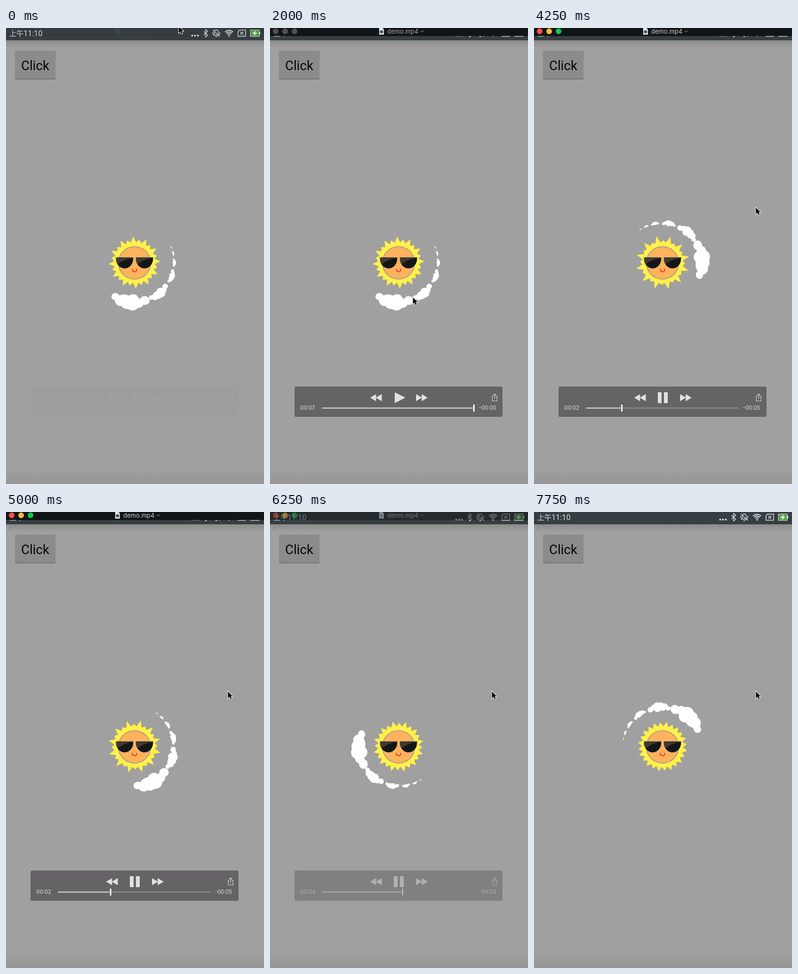
Recreate the animation shown at these times as an HTML page with a canvas. Size 546 by 964 pixels, loop 8 s.

```html
<!DOCTYPE html>
<html lang="zh">
<head>
<meta charset="utf-8">
<title>Sun loader</title>
<style>
html, body { margin: 0; width: 546px; height: 964px; overflow: hidden; background: #a0a0a0; }
canvas { display: block; }
</style>
</head>
<body>
<canvas id="stage" width="546" height="964"></canvas>
<script>
const g = document.getElementById('stage').getContext('2d');
const LOOP = 8000, STEP = 250, PLAY = 2750;
const CX = 272, CY = 496, RAD = Math.PI / 180;

const clamp = v => Math.max(0, Math.min(1, v));
const ease = (t, from, to) => {
  const p = clamp((t - from) / (to - from));
  return p * p * (3 - 2 * p);
};

function rect(x, y, w, h, color, r = 0) {
  g.fillStyle = color;
  g.beginPath();
  g.roundRect(x, y, w, h, r);
  g.fill();
}

function disc(x, y, r, color) {
  g.fillStyle = color;
  g.beginPath();
  g.arc(x, y, r, 0, 2 * Math.PI);
  g.fill();
}

function fill(d, color) {
  g.fillStyle = color;
  g.fill(new Path2D(d));
}

function line(d, color, width) {
  g.strokeStyle = color;
  g.lineWidth = width;
  g.stroke(new Path2D(d));
}

function text(s, x, y, font, color) {
  g.font = font;
  g.fillStyle = color;
  g.fillText(s, x, y);
}

function shade(y0, y1, top, bottom) {
  const fade = g.createLinearGradient(0, y0, 0, y1);
  fade.addColorStop(0, `rgba(0,0,0,${top})`);
  fade.addColorStop(1, `rgba(0,0,0,${bottom})`);
  g.fillStyle = fade;
  g.fillRect(0, y0, 546, y1 - y0);
}

function drawPage() {
  rect(0, 0, 546, 964, '#a0a0a0');
  shade(26, 42, 0.13, 0);
  shade(930, 964, 0, 0.07);
  rect(19, 48, 86, 60.5, '#676767', 2);
  rect(19, 48, 86, 59, '#8b8b8b', 2);
  text('Click', 32, 88.5, '27.5px Roboto, sans-serif', '#050505');
}

function drawStatus() {
  const ink = '#dcdfe0';
  rect(0, 0, 546, 26, '#373e42');
  text('上午', 7, 17, '15px "Noto Sans CJK SC", "Noto Sans CJK", sans-serif', ink);
  text('11:10', 37, 17, '16.2px Roboto, sans-serif', ink);
  for (let i = 0; i < 3; i++) disc(394 + 6 * i, 16, 2, ink);
  // bluetooth, muted bell, no-card box
  line('M418 7L427 15L422.5 19V3L427 7L418 15', ink, 1.4);
  line('M439 15Q441 13 441 9Q441 4 445 4T449 9Q449 13 451 15ZM443 18H447M438 4L452 18M437.5 8V13M452.5 8V13', ink, 1.4);
  line('M494 4.5H507V17.5H491V8ZM496 8L502 14M502 8L496 14', ink, 1.5);
  // wifi
  g.strokeStyle = ink;
  g.lineWidth = 2;
  for (const r of [5, 8.5, 12]) {
    g.beginPath();
    g.arc(472, 17, r, -135 * RAD, -45 * RAD);
    g.stroke();
  }
  disc(472, 16.5, 1.8, ink);
  // battery
  line('M517.5 4.5H535.5V17.5H517.5Z', ink, 1.5);
  rect(519, 6, 15, 10, '#45b52f');
  rect(536, 8, 2, 6, ink);
  fill('M529 5L521 12H526L524 17L532 10H527Z', '#fff');
}

// Long and short spikes alternate and trade length with the swing
function drawRays(phase, swing) {
  const radii = [55.5 + 2.5 * swing, 43, 49 - 2.3 * swing, 43];
  g.fillStyle = '#fff04a';
  g.beginPath();
  for (let i = 0; i < 48; i++) {
    const a = (phase + i * 7.5) * RAD, r = radii[i % 4];
    g.lineTo(CX + r * Math.cos(a), CY + r * Math.sin(a));
  }
  g.fill();
}

function drawLens(x) {
  const lens = `M${x} 485h36v3a18 20 0 0 1 -36 0z`;
  g.save();
  line(lens, '#8f8a86', 1);
  g.clip(new Path2D(lens));
  rect(x, 485, 36, 24, '#141616');
  fill(`M${x} 485h36v1q-22 3 -34 15h-2z`, '#403a30');
  g.restore();
}

function drawFace() {
  disc(CX, CY + 0.5, 35.2, '#a09a91');
  disc(CX, CY + 0.5, 33.5, '#ffb25d');
  drawLens(233);
  drawLens(275);
  g.lineCap = 'round';
  line('M267.3 510c0 7.3 9.4 7.3 9.4 0', '#ea3a2d', 2.2);
  g.lineCap = 'butt';
}

// A row of puffs, tallest in the middle, on top of a flat core
function drawCloud() {
  const puff = (x, y, rx, ry) => {
    g.moveTo(x + rx, y);
    g.ellipse(x, y, rx, ry, 0, 0, 2 * Math.PI);
  };
  g.fillStyle = '#fff';
  g.beginPath();
  for (let i = 0; i < 6; i++) {
    const h = Math.sin(Math.PI * i / 5), r = 8.5 + 4 * h + (i % 2 ? -0.8 : 0.8);
    puff(-32 + 12.5 * i, 8 - 12 * h, r + 1, r);
  }
  puff(-7, 5, 13, 13);
  puff(10, 6, 15, 9);
  g.fill();
}

// Each cloud is smaller and follows closer than the one before
function drawTrail(lead) {
  for (let i = 0; i < 6; i++) {
    const lag = 138 * (1 - 0.666 ** i), scale = 0.6 ** i;
    g.save();
    g.globalAlpha = clamp(scale * 9);
    g.translate(CX, CY);
    g.rotate((lead - lag + 90) * RAD);
    g.translate(0, -84.5);
    g.scale(scale, scale);
    drawCloud();
    g.restore();
  }
}

function drawTitle(active) {
  const lights = active ? ['#fb504c', '#fdb93c', '#14c84c'] : Array(3).fill('#505152');
  rect(0, 0, 546, 17, '#121517');
  lights.forEach((color, i) => disc(12 + 20 * i, 7, 6, color));
  fill('M231 0h7l3 3v11h-10z', '#e4e7e9');
  disc(236, 8, 3.6, '#3f5d70');
  text('demo.mp4', 248, 12, '13px Inter, sans-serif', active ? '#cfcfcf' : '#a6a6a6');
  line('M318.5 5.5l3.5 3l3.5 -3', '#777', 1.2);
}

function drawPlayer(playing, seconds) {
  const ink = '#e2e1e2', font = '11.3px Inter, sans-serif';
  const knob = playing ? 110 + 47.4 * seconds : 431.5;
  const passed = playing ? Math.round(seconds) : 7;
  rect(52, 758, 440, 64, '#656365', 3);
  for (const dx of [0, 12]) {
    fill(`M${212 + dx} 781.5l12.5 -7.5v15z`, ink);
    fill(`M${333.5 - dx} 781.5l-12.5 -7.5v15z`, ink);
  }
  fill(playing ? 'M262 770h8v23h-8zM275 770h8v23h-8z' : 'M264 770l22.5 11.5l-22.5 11.5z', ink);
  line('M473 778.5h-2.5v10h10v-10h-2.5M475.5 784v-10.5m-3 3l3 -3l3 3', ink, 1.1);
  text('00:0' + passed, 64, 807, font, ink);
  text('-00:0' + (7 - passed), 442, 807, font, ink);
  rect(110, 802, 324, 3, '#858385', 1.5);
  rect(110, 802, knob - 110, 3, '#bcbabc', 1.5);
  rect(knob - 2.5, 796, 5, 15, '#656365');
  rect(knob - 1.5, 796, 3, 15, '#fff', 1);
}

// Drops in, goes down to the play button, then rests at the right
function drawCursor(t) {
  const enter = ease(t, 0, 500), press = ease(t, 2000, 2500), leave = ease(t, 2500, 3250);
  const arrow = 'M0.5 0.5v14l3.2 -3l2.3 5l2.5 -1l-2.2 -5h4.2z';
  g.save();
  g.translate(365 - 63 * enter - 28 * press + 195 * leave, -4 + 573 * enter + 211 * press - 401 * leave);
  line(arrow, '#f4f4f4', 2);
  fill(arrow, '#0b0b0b');
  g.restore();
}

function draw(t) {
  const playing = t >= PLAY;
  const turn = (t - 3250) / 1000;
  drawPage();
  drawStatus();
  drawRays(playing ? 2 - 45 * turn : 27, playing ? Math.cos(2 * Math.PI * turn / 8.6) : -0.2);
  drawFace();
  drawTrail(playing ? 266.5 + 90 * turn : 97.5);

  g.globalAlpha = clamp(Math.min((t + 30) / 500, (6500 - t) / 500));
  drawTitle(t >= 2500);
  drawPlayer(playing, turn + 0.6);
  g.globalAlpha = 1;
  drawCursor(t);
}

let shown = -1;
const start = performance.now();
function tick() {
  const t = Math.floor(((performance.now() - start) % LOOP) / STEP) * STEP;
  if (t !== shown) draw(shown = t);
  requestAnimationFrame(tick);
}
tick();
</script>
</body>
</html>
```
